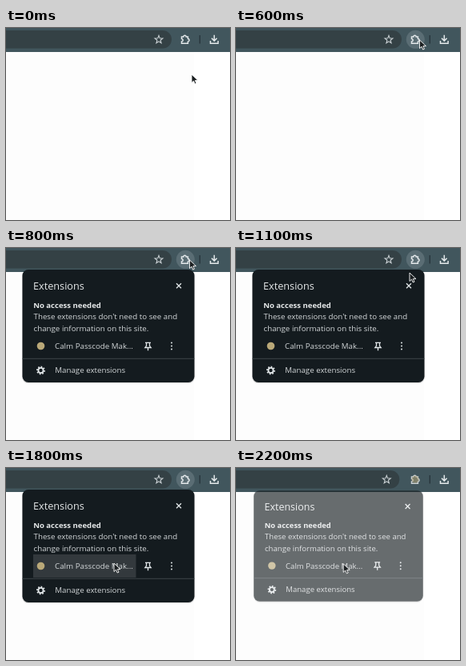
Write an HTML page that moves like this. It is 280x240 px and loops after 2.3 s.

```html
<!DOCTYPE html>
<html lang="en">
<head>
<meta charset="utf-8">
<title>Extensions menu</title>
<style>
  html, body { margin: 0; width: 100%; height: 100%; overflow: hidden; background: #fdfdfd; }
  svg { display: block; width: 280px; height: 240px; }
  text { font: 9.75px "Open Sans", "Noto Sans", sans-serif; fill: #d3d7d9; }
  .title { font-size: 12.7px; fill: #e6e9ea; }
  .bold { font-size: 9.55px; font-weight: 700; fill: #e6e9ea; }
  .line { fill: none; stroke: #e3e8ea; stroke-width: 1.3; }
</style>
</head>
<body>
<svg viewBox="0 0 280 240">
  <rect width="280" height="240" fill="#fdfdfd"/>
  <rect x="235" y="30" width="45" height="210" fill="#fff"/>

  <!-- toolbar -->
  <rect width="280" height="30" fill="#41565d"/>
  <g id="bar">
    <rect x="-20" y="3" width="227" height="22.5" rx="11.2" fill="#344145"/>
    <path id="star" class="line" transform="translate(191 14.6)" style="stroke: #cbd2d5; stroke-width: 1.1"/>
  </g>
  <circle id="halo" cx="224.3" cy="14.3" r="11.5" fill="#5a6d74"/>
  <path id="puzzle" class="line" transform="translate(223.8 14.2)" style="stroke-width: 1.5"
    d="M-4.3-3.2H-2a1.7 1.7 0 0 1 3.4 0H3.6V-.6a1.7 1.7 0 0 1 0 3.4V5H-4.3V2.8a1.7 1.7 0 0 0 0-3.4Z"/>
  <circle id="badge" cx="224" cy="14.3" r="4.5" fill="#b9a878"/>
  <path d="M242.3 9V19.500" stroke="#26343a" stroke-width="1.3"/>
  <path class="line" style="stroke-width: 1.5" d="M260.300 8.800V15.800M257 12.800l3.300 3.300 3.300-3.300M255.500 16v3.200h9.600V16"/>

  <!-- menu -->
  <g id="menu">
    <rect x="20" y="27" width="216" height="142.300" rx="8" fill="#000" opacity=".15"/>
    <rect x="20.500" y="27" width="215" height="141" rx="7.500" fill="#141b1f"/>
    <rect id="hover" x="34" y="108" width="128.500" height="29" fill="#33393d"/>
    <text class="title" x="34" y="52.200">Extensions</text>
    <path class="line" d="M213 44.200l6 6m0-6l-6 6"/>
    <text class="bold" x="34.200" y="74.700">No access needed</text>
    <text x="34.500" y="89.300">These extensions don't need to see and</text>
    <text x="34.500" y="104">change information on this site.</text>
    <circle cx="43.500" cy="122.500" r="4.800" fill="#b9a878"/>
    <text x="61" y="126">Calm Passcode Mak...</text>
    <path class="line" d="M174 118.300h7M175.500 118.300v4l-1.700 2.200h7.400l-1.700-2.200v-4M177.500 124.500v3.700"/>
    <path d="M207 118.600v.01m0 3.990v.01m0 3.990v.01" stroke="#dfe4e6" stroke-width="2" stroke-linecap="round"/>
    <path d="M20.500 138.300h215" stroke="#3c4448"/>
    <circle class="line" cx="43.500" cy="153" r="3.100" style="stroke-width: 1.8"/>
    <circle class="line" cx="43.500" cy="153" r="4.600" style="stroke-width: 1.7" pathLength="16" stroke-dasharray="1"/>
    <text x="61.200" y="156.300">Manage extensions</text>
  </g>

  <path id="cursor" d="M0 0V10.500L2.500 8.200 4.200 12 6 11.200 4.400 7.600H8Z"
    fill="#1b1f21" stroke="#fff" stroke-width=".9" stroke-linejoin="round"/>
</svg>
<script>
const $ = id => document.getElementById(id);
const LOOP = 2300, STEP = 100;

// time, x, y of the pointer tip
const route = [
  [0, 232, 58], [100, 232, 54], [300, 231, 29], [400, 230, 19], [500, 229.5, 15],
  [800, 229.5, 15], [900, 229, 16], [1000, 226, 20], [1100, 217, 31], [1200, 203, 48],
  [1300, 172, 78], [1400, 148, 97], [1600, 138, 112], [1800, 135, 119], [2300, 134, 120]
];

function pointAt(t) {
  const i = route.findIndex(p => p[0] > t);
  const [t0, x0, y0] = route[i - 1], [t1, x1, y1] = route[i];
  const k = (t - t0) / (t1 - t0);
  return [x0 + (x1 - x0) * k, y0 + (y1 - y0) * k];
}

const show = (id, opacity) => $(id).setAttribute("opacity", opacity);

$("star").setAttribute("d", "M" + Array.from({ length: 10 }, (_, i) => {
  const a = i * Math.PI / 5, r = i % 2 ? 2.2 : 5.2;
  return [r * Math.sin(a), -r * Math.cos(a)].map(v => v.toFixed(2));
}).join("L") + "Z");

function draw(now) {
  const t = Math.floor(now % LOOP / STEP) * STEP;
  const [x, y] = pointAt(t);
  const closing = t >= 2200;
  const partial = t === 700 || closing;
  $("cursor").setAttribute("transform", `translate(${x} ${y})`);
  $("menu").setAttribute("transform", partial ? "translate(128 97.5) scale(.984) translate(-128 -97.5)" : "");
  show("menu", t < 700 ? 0 : closing ? .64 : partial ? .7 : 1);
  show("hover", t >= 1600 && !closing ? 1 : 0);
  show("halo", closing || t < 400 ? 0 : t === 400 ? .5 : 1);
  show("puzzle", closing ? .85 : 1);
  show("badge", closing ? .5 : 0);
  $("bar").setAttribute("transform", closing ? "translate(-2.7 0)" : "");
  requestAnimationFrame(draw);
}
draw(0);
</script>
</body>
</html>
```
